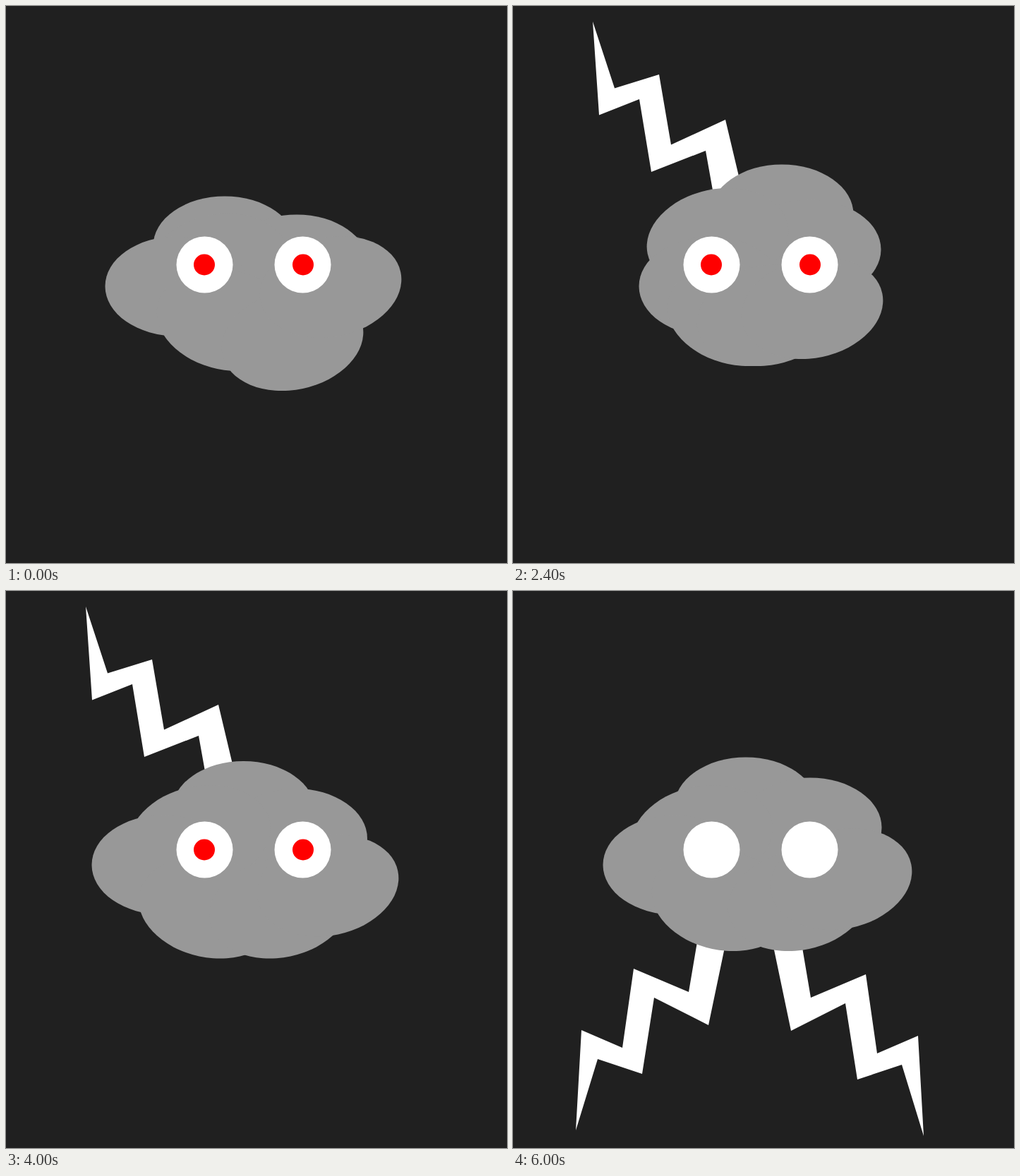
Write an HTML page without scripts that moves like this. It is 710 by 789 pixels and loops after 6.2 s.

```html
<!DOCTYPE html>
<html lang="en">
<head>
<meta charset="utf-8">
<title>Storm cloud</title>
<style>
  html, body { margin: 0; width: 100%; height: 100%; overflow: hidden; background: #202020; }
  svg { display: block; width: 710px; height: 789px; overflow: hidden; }

  /* the loop is 31 ticks of .2s; a small lead keeps ticks clear of rounding */
  .bolts { fill: #fff; }
  .bolts use { animation: flash 6.2s step-end infinite; animation-delay: calc(var(--at) * .2s - 6.205s); }
  @keyframes flash {
    0% { visibility: visible; }
    3.22%, 100% { visibility: hidden; }
  }

  /* every puff wanders through its own places a to f, one step per tick */
  .cloud { fill: #989898; }
  .cloud ellipse { rx: 101.5px; ry: 70.5px; animation: drift 6.2s -.005s infinite; }
  .up { rotate: -12deg; }
  .down { rotate: 12deg; }
  @keyframes drift {
    0% { translate: var(--a); animation-timing-function: steps(4); }
    12.9% { translate: var(--b); animation-timing-function: steps(4); }
    25.8% { translate: var(--c); animation-timing-function: steps(4); }
    38.7% { translate: var(--d); animation-timing-function: steps(5); }
    54.83% { translate: var(--e); animation-timing-function: steps(6); }
    74.19% { translate: var(--f); animation-timing-function: steps(4); }
    87.09% { translate: var(--e); animation-timing-function: steps(3); }
    96.77%, 100% { translate: var(--f); }
  }

  .eyes { fill: #fff; }
  .pupils { fill: #f00; animation: blink 6.2s -.005s step-end infinite; }
  @keyframes blink {
    0% { visibility: visible; }
    96.77%, 100% { visibility: hidden; }
  }
</style>
</head>
<body>
<svg viewBox="0 0 710 789">
  <defs>
    <path id="tl" d="M113 22L144 116.500 207 97 224 196.500 301 161 334 300H290L273 205 196 235 179 132 122 154.500Z"/>
    <path id="bl" d="M89 764L120 663 183 684 200 576 277 615 311.500 450H269L249 568 171 535 155 647 97 622Z"/>
    <use id="tr" href="#tl" transform="translate(719 -7) scale(-1 1)"/>
    <use id="br" href="#bl" transform="translate(671 8) scale(-1 1)"/>
  </defs>

  <g class="bolts">
    <use href="#tl" style="--at:4"/>
    <use href="#tl" style="--at:12"/>
    <use href="#tl" style="--at:16"/>
    <use href="#tl" style="--at:20"/>
    <use href="#tl" style="--at:28"/>
    <use href="#bl" style="--at:10"/>
    <use href="#bl" style="--at:17"/>
    <use href="#bl" style="--at:23"/>
    <use href="#bl" style="--at:30"/>
  </g>
  <!-- right-hand bolts mirror the left ones -->
  <g class="bolts" transform="translate(719 -7) scale(-1 1)">
    <use href="#tl" style="--at:2"/>
    <use href="#tl" style="--at:14"/>
    <use href="#tl" style="--at:22"/>
    <use href="#tl" style="--at:26"/>
  </g>
  <g class="bolts" transform="translate(671 8) scale(-1 1)">
    <use href="#bl" style="--at:6"/>
    <use href="#bl" style="--at:9"/>
    <use href="#bl" style="--at:15"/>
    <use href="#bl" style="--at:21"/>
    <use href="#bl" style="--at:30"/>
  </g>

  <g class="cloud">
    <!-- top, right shoulder, left shoulder -->
    <ellipse style="--a:310px 340px; --b:381px 295px; --c:330px 372px; --d:381px 295px; --e:343px 317px; --f:330px 306px"/>
    <ellipse style="--a:412px 366px; --b:420px 345px; --c:400px 345px; --d:420px 345px; --e:400px 366px; --f:421px 335px"/>
    <ellipse class="up" style="--a:300px 366px; --b:309px 338px; --c:282px 366px; --d:290px 330px; --e:281px 347px; --f:268px 347px"/>
    <!-- left, bottom left, bottom right, right -->
    <ellipse style="--a:242px 397px; --b:242px 388px; --c:229px 388px; --d:280px 397px; --e:217px 388px; --f:229px 388px"/>
    <ellipse class="down" style="--a:314px 445px; --b:302px 445px; --c:294px 430px; --d:319px 438px; --e:280px 459px; --f:297px 438px"/>
    <ellipse class="up" style="--a:406px 473px; --b:372px 420px; --c:410px 447px; --d:361px 438px; --e:372px 459px; --f:405px 438px"/>
    <ellipse class="up" style="--a:460px 398px; --b:427px 427px; --c:477px 387px; --d:424px 428px; --e:447px 427px; --f:465px 408px"/>
  </g>

  <g class="eyes">
    <circle cx="281.500" cy="366.500" r="40"/>
    <circle cx="420.500" cy="366.500" r="40"/>
  </g>
  <g class="pupils">
    <circle cx="281" cy="366.500" r="15"/>
    <circle cx="421" cy="366.500" r="15"/>
  </g>
</svg>
</body>
</html>
```
